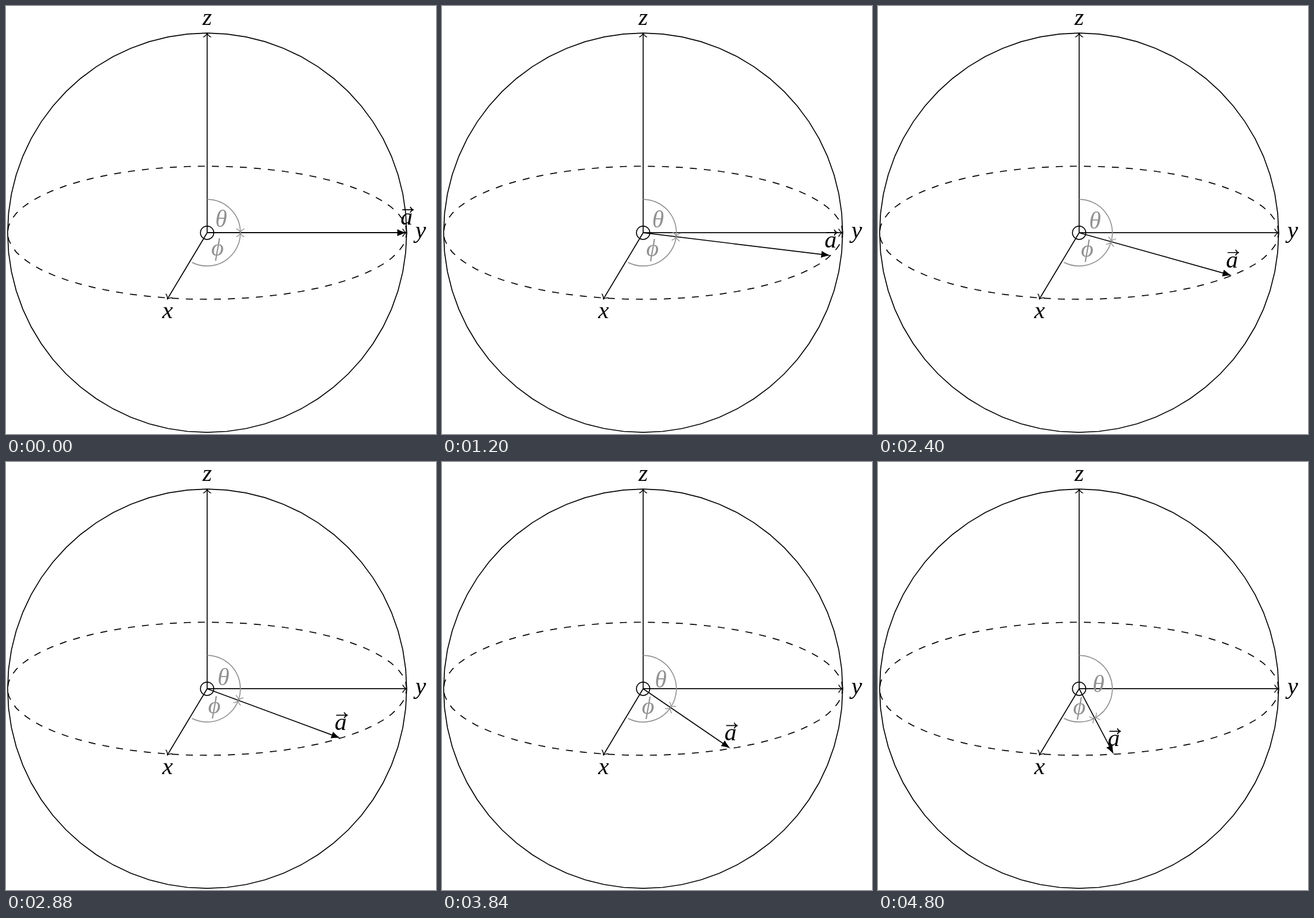
An HTML page that plays this animation: 750 by 746 pixels, repeating every 5040 ms.

```html
<!DOCTYPE html>
<html lang="en">
<head>
<meta charset="utf-8">
<title>Vector in spherical coordinates</title>
<style>
  html, body { margin: 0; width: 100%; height: 100%; overflow: hidden; background: #fff; }
  svg { display: block; width: 750px; height: 746px; }
  path, line, polygon, circle { fill: none; stroke-width: 1.7; }
  text { font: italic 42px "Liberation Serif", "Noto Serif", serif; text-anchor: middle; fill: #000; }
  .gray { stroke: #929292; }
  text.gray { stroke: none; fill: #929292; }
  #head { fill: #000; stroke: none; }
  #barb { stroke-width: 1.4; stroke-linecap: round; stroke-linejoin: round; }
</style>
</head>
<body>
<svg viewBox="0 0 750 746" stroke="#000">
  <defs>
    <path id="barb" d="M-6.7-6.5C-6.3-4.1-1.8-.4-.6 0C-1.8.4-6.3 4.1-6.7 6.5"/>
    <marker id="to" markerUnits="userSpaceOnUse" orient="auto" overflow="visible"><use href="#barb"/></marker>
    <marker id="toGray" class="gray" markerUnits="userSpaceOnUse" orient="auto" overflow="visible"><use href="#barb"/></marker>
    <marker id="latex" markerUnits="userSpaceOnUse" orient="auto" overflow="visible" refX="-8">
      <path id="head" d="M0 0C-4.3.8-11.4 3.3-16.3 6.1V-6.1C-11.4-3.3-4.3-.8 0 0"/>
    </marker>
  </defs>
  <g transform="translate(350.8 395.2)">
    <polygon id="sphere"/>
    <polygon id="equator" stroke-dasharray="12.23"/>
    <circle r="11.6"/>
    <g marker-end="url(#to)">
      <line y2="-348"/>
      <line x2="348"/>
      <line x2="-69.6" y2="116"/>
    </g>
    <line id="vector" marker-end="url(#latex)"/>
    <path id="thetaArc" class="gray" marker-end="url(#toGray)"/>
    <path id="phiArc" class="gray" marker-end="url(#toGray)"/>
    <g stroke="none">
      <text y="-362">z</text>
      <text x="372.5" y="8.5">y</text>
      <text x="-69" y="149">x</text>
      <text id="theta" class="gray">θ</text>
      <text id="phi" class="gray">ϕ</text>
    </g>
    <g id="label">
      <text y="-14" stroke="none">a</text>
      <path d="M-7-40H11.5M6.5-44.5Q8-41 12-40Q8-39 6.5-35.5" stroke-linecap="round"/>
    </g>
  </g>
</svg>
<script>
  const R = 348, FLAT = 116, ARC = 58, LABEL = 34.8;
  const STEP = 240, COUNT = 21, RAD = Math.PI / 180;
  const TOP = -90 * RAD, X_AXIS = 117 * RAD;
  const $ = id => document.getElementById(id);
  const polar = (a, rx, ry = rx) => [rx * Math.cos(a), ry * Math.sin(a)];
  const set = (id, attrs) => {
    for (const key in attrs) $(id).setAttribute(key, attrs[key]);
  };

  // 64-sided outline, running counterclockwise from the right
  const outline = ry => Array.from({ length: 64 }, (_, i) => polar(-i * Math.PI / 32, R, ry)).join(" ");
  set("sphere", { points: outline(R) });
  set("equator", { points: outline(FLAT) });

  function drawAngle(name, from, to, drop) {
    const sweep = to > from ? 1 : 0;
    set(name + "Arc", { d: `M${polar(from, ARC)}A${ARC} ${ARC} 0 0 ${sweep} ${polar(to, ARC)}` });
    const [x, y] = polar((from + to) / 2, LABEL);
    set(name, { x, y: y + drop });
  }

  function draw(now) {
    const step = Math.floor(now / STEP) % COUNT;
    const [x, y] = polar(step * 4 * RAD, R, FLAT);
    const angle = Math.atan2(y, x);
    const [x2, y2] = polar(angle, Math.hypot(x, y) - 8);
    set("vector", { x2, y2 });
    set("label", { transform: `translate(${x} ${y})` });
    drawAngle("theta", TOP, angle, 14);
    drawAngle("phi", X_AXIS, angle, 10);
  }

  const start = performance.now();
  function tick() {
    draw(performance.now() - start);
    requestAnimationFrame(tick);
  }
  tick();
</script>
</body>
</html>
```
